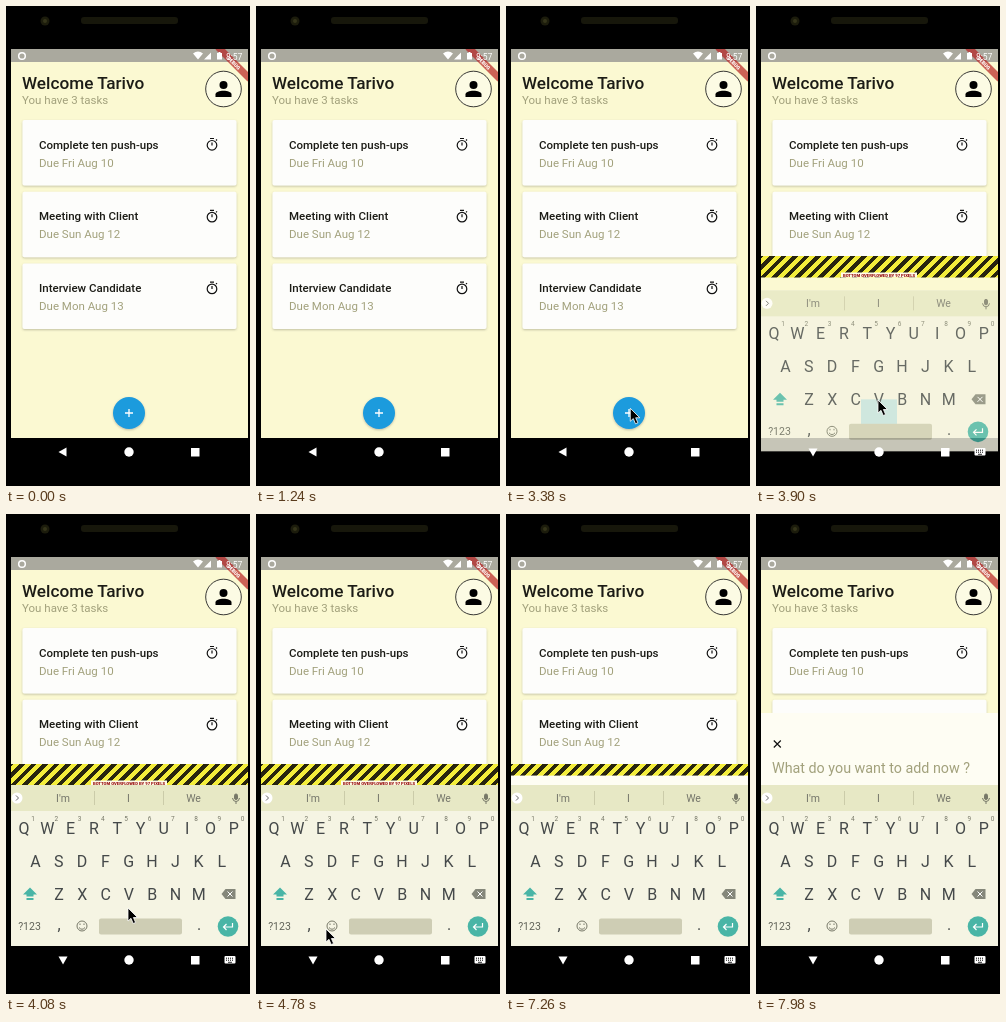
Write an HTML page that moves like this. It is 244 px wide and 480 px high and loops after 8000 ms.

```html
<!DOCTYPE html>
<html lang="en">
<head>
<meta charset="utf-8">
<title>Task list</title>
<style>
  html, body { margin: 0; width: 100%; height: 100%; overflow: hidden; background: #000; }
  svg { display: block; width: 100vw; height: 100vh; font-family: Roboto, sans-serif; }
  .medium { font-weight: 500; }
  .mid { text-anchor: middle; }
  .muted { fill: #a2a17c; }
  .line { fill: none; stroke: #111; stroke-width: 1.2; }
  .key { font-size: 16px; fill: #45494a; }
</style>
</head>
<body>
<svg viewBox="0 0 244 480">
  <defs>
    <linearGradient id="hazard" gradientUnits="userSpaceOnUse" x1="5" y1="250" x2="10.75" y2="255.75" spreadMethod="repeat">
      <stop offset=".25" stop-color="#27240f"/><stop offset=".25" stop-color="#f3ed3b"/>
      <stop offset=".75" stop-color="#f3ed3b"/><stop offset=".75" stop-color="#27240f"/>
    </linearGradient>
    <clipPath id="screen"><rect x="5" y="43" width="237" height="389"/></clipPath>
    <filter id="shadow" x="-20%" y="-20%" width="140%" height="150%">
      <feDropShadow dx="0" dy="1" stdDeviation="1" flood-color="#665" flood-opacity=".4"/>
    </filter>
    <g id="timer" class="line">
      <circle r="4.8" cy=".8"/><path d="M-2-6H2M0-2V1M4-4L5-5"/>
    </g>
  </defs>

  <rect width="244" height="480"/>
  <rect x="75" y="11" width="97" height="7" rx="3" fill="#17170b"/>
  <circle cx="39" cy="15" r="4.5" fill="#1c1c0c"/><circle cx="39" cy="15" r="2" fill="#34341a"/>

  <g clip-path="url(#screen)">
    <rect x="5" y="43" width="237" height="389" fill="#fbf9d2"/>
    <text class="medium" x="16" y="83" font-size="17.2" fill="#1c1c16">Welcome Tarivo</text>
    <text class="muted" x="16" y="97.500" font-size="11.5">You have 3 tasks</text>
    <circle cx="217.500" cy="83" r="17.800" fill="#fcfbe4" stroke="#222" stroke-width=".9"/>
    <circle cx="217.500" cy="79" r="4"/>
    <path d="M209.500 91V88.500C209.500 83.500 225.500 83.500 225.500 88.500V91Z"/>
    <g id="cards"></g>
    <g id="fab">
      <circle cx="123" cy="407" r="16" fill="#1b9bdd" filter="url(#shadow)"/>
      <path d="M119 407H127M123 403V411" stroke="#fff" stroke-width="1.300"/>
    </g>
    <g id="overflow">
      <rect x="5" y="250" width="237" height="182" fill="#fbf9d2"/>
      <rect x="5" y="250" width="237" height="21.500" fill="url(#hazard)"/>
      <rect x="85" y="266.500" width="76" height="5" fill="#fffbe8"/>
      <text class="mid" x="123" y="270.600" font-size="4.200" font-weight="900" fill="#960f0f">BOTTOM OVERFLOWED BY 97 PIXELS</text>
    </g>
    <g id="sheet">
      <rect x="5" y="199" width="237" height="73" fill="#fefdf3"/>
      <path class="line" d="M17.800 226.500L24.800 233.500M24.800 226.500L17.800 233.500"/>
      <text class="muted" x="16" y="259" font-size="14.300">What do you want to add now ?</text>
    </g>

    <rect x="5" y="43" width="237" height="13" fill="#aaa99e"/>
    <path d="M212 41L244 73" stroke="#b71c1c" stroke-opacity=".68" stroke-width="7"/>
    <text class="mid" transform="translate(228 57) rotate(45)" y="2" font-size="5" font-weight="900" fill="#fff">DEBUG</text>
    <g fill="#fff">
      <circle cx="16" cy="50" r="3.300" fill="none" stroke="#fff" stroke-width="1.500"/>
      <path d="M187 47.500Q192 43.500 197 47.500L192 53.500ZM198 53.500H205V46.500ZM211 47H212.500V46H214.500V47H216V53.500H211Z"/>
      <text x="220" y="53.500" font-size="8.500">8:57</text>
    </g>
  </g>

  <g id="keyboard">
    <rect x="5" y="271" width="237" height="161" fill="#f5f4e3"/>
    <rect x="5" y="271" width="237" height="26" fill="#e7e8c5"/>
    <rect id="ghost" x="105" y="380" width="36" height="27" fill="#9fd5e2" opacity=".55"/>
    <circle cx="11" cy="284" r="5.500" fill="#fff"/>
    <path d="M10 281.500L12.500 284L10 286.500" fill="none" stroke="#666"/>
    <path d="M88.500 277V291M157.500 277V291" stroke="#cbcba9"/>
    <g class="mid" font-size="10.500" fill="#74756a">
      <text x="57" y="288">I'm</text><text x="122.500" y="288">I</text><text x="187.500" y="288">We</text>
    </g>
    <g fill="none" stroke="#777868">
      <rect x="228.500" y="280" width="3" height="5.500" rx="1.500" fill="#777868"/>
      <path d="M226.500 284Q227 287.500 230 287.500T233.500 284M230 287.500V290"/>
    </g>
    <g id="keys"></g>
    <path d="M24 373.500L31 380.500H27.500V382.500H20.500V380.500H17ZM20.500 384H27.500V386H20.500Z" fill="#49b5a6"/>
    <path d="M215.500 380L219.500 375H229.500V385H219.500Z" fill="#85877a"/>
    <path d="M221.500 377.500L226.500 382.500M226.500 377.500L221.500 382.500" stroke="#fff"/>
    <text class="mid" x="23.500" y="416" font-size="10.500" fill="#606258">?123</text>
    <text class="mid key" x="53" y="416">,</text>
    <text class="mid key" x="193" y="416">.</text>
    <g fill="none" stroke="#777868">
      <circle cx="76" cy="412" r="5"/><path d="M73 413.500Q76 417 79 413.500M74 409.500V411M78 409.500V411"/>
    </g>
    <rect x="93" y="404.500" width="83" height="16" rx="2" fill="#cecdb4"/>
    <circle cx="222" cy="412.500" r="10.300" fill="#49b5a6"/>
    <path d="M226.500 409V413H217.500M220.500 410L217.500 413L220.500 416" fill="none" stroke="#fff" stroke-width="1.200"/>
  </g>

  <g fill="#fff">
    <path id="back" d="M52.500 446L60.500 441.500V450.500Z"/>
    <circle cx="123" cy="446" r="4.700"/>
    <rect x="185" y="442" width="8.500" height="8.500"/>
    <g id="switcher">
      <rect x="218.500" y="442" width="11" height="7.500" rx="1"/>
      <path d="M220 444.200H228M220 446.200H228" stroke="#000" stroke-dasharray="1 1"/>
      <path d="M222 448.300H226" stroke="#000" stroke-width=".8"/>
    </g>
  </g>
  <path id="cursor" d="M0 0V13L3 10.300L5.200 15.500L7.600 14.500L5.400 9.500H9.500Z" stroke="#fff" stroke-width=".8"/>
</svg>

<script>
const LOOP = 8000;
const INSET_AT = 3880;
const KEYBOARD_AT = 3845;
const SHEET_AT = 7193;
const el = id => document.getElementById(id);
const clamp = x => Math.min(1, Math.max(0, x));
const smooth = x => x * x * (3 - 2 * x);
const show = (id, on) => el(id).setAttribute("visibility", on ? "visible" : "hidden");
const move = (id, x, y) => el(id).setAttribute("transform", `translate(${x} ${y})`);

const tasks = [
  ["Complete ten push-ups", "Due Fri Aug 10"],
  ["Meeting with Client", "Due Sun Aug 12"],
  ["Interview Candidate", "Due Mon Aug 13"]
];
el("cards").innerHTML = tasks.map(([title, due], i) => `
  <g transform="translate(0 ${i * 71.8})">
    <rect x="16.500" y="114" width="214" height="65.500" rx="2" fill="#fdfdfb" filter="url(#shadow)"/>
    <text class="medium" x="33" y="142.500" font-size="11.5" fill="#1c1c16">${title}</text>
    <text class="muted" x="33" y="160.500" font-size="11.5">${due}</text>
    <use href="#timer" x="206" y="138.500"/>
  </g>`).join("");

const rows = [["QWERTYUIOP", 18, 320], ["ASDFGHJKL", 29.5, 353], ["ZXCVBNM", 53, 386]];
el("keys").innerHTML = rows.map(([letters, left, y], row) =>
  [...letters].map((letter, i) => {
    const x = left + i * 23.3;
    const digit = row ? "" : `<text class="mid" x="${x + 9}" y="307" font-size="6.500" fill="#777868">${(i + 1) % 10}</text>`;
    return `<text class="mid key" x="${x}" y="${y}">${letter}</text>${digit}`;
  }).join("")).join("");

// Cursor path: time, x, y
const path = [[1700, -12, 430], [2250, 126, 408.5], [3200, 126, 408.5], [3600, 122, 394],
              [4350, 122, 394], [4780, 70, 415], [5060, -12, 444]];

function drawCursor(t) {
  const i = path.findIndex(p => p[0] > t);
  show("cursor", i > 0);
  if (i < 1) return;
  const [t0, x0, y0] = path[i - 1], [t1, x1, y1] = path[i];
  const k = smooth((t - t0) / (t1 - t0));
  move("cursor", x0 + (x1 - x0) * k, y0 + (y1 - y0) * k);
}

function draw(t) {
  const inset = t >= INSET_AT;
  show("overflow", inset);
  show("switcher", inset);
  show("fab", !inset);
  el("back").setAttribute("transform", inset ? "rotate(-90 57 446)" : "");

  const rise = clamp((t - KEYBOARD_AT) / 220);
  const fade = clamp((t - KEYBOARD_AT) / 100);
  show("keyboard", t > KEYBOARD_AT);
  move("keyboard", 0, 24 * (1 - rise) ** 2);
  el("keyboard").setAttribute("opacity", 1 - (1 - fade) ** 2);
  el("ghost").setAttribute("opacity", t < 3960 ? 0.55 : 0);

  show("sheet", t > SHEET_AT);
  move("sheet", 0, 72 * (1 - smooth(clamp((t - SHEET_AT) / 300))));
  drawCursor(t);
}

const start = performance.now();
function tick() {
  draw((performance.now() - start) % LOOP);
  requestAnimationFrame(tick);
}
tick();
</script>
</body>
</html>
```
